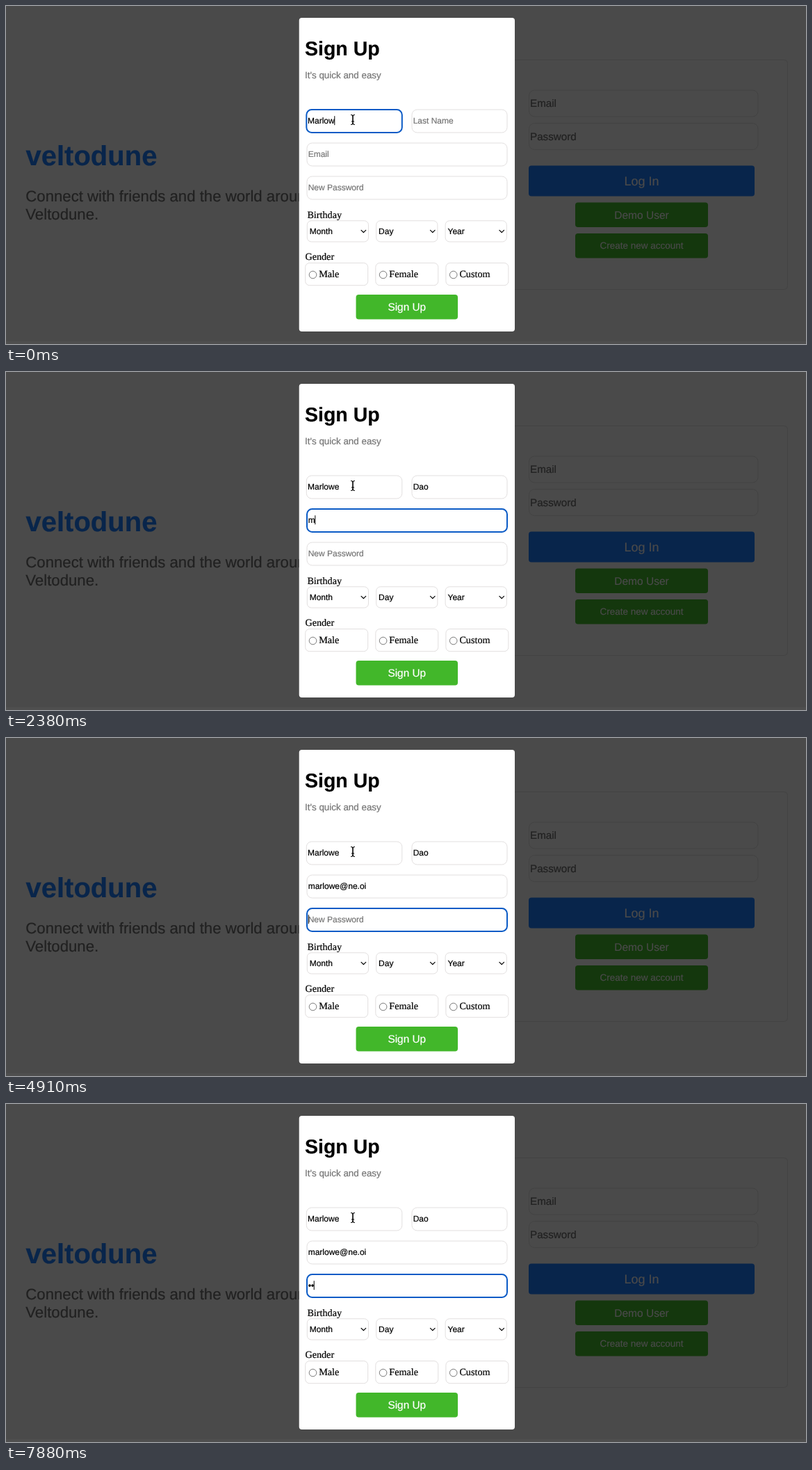
An HTML page for the animation above (8000 ms loop, 1151 by 486 pixels).

```html
<!DOCTYPE html>
<html lang="en">
<head>
<meta charset="utf-8">
<title>Sign up form</title>
<style>
  html, body { margin: 0; width: 100%; height: 100%; overflow: hidden; background: #4a4a4a; }
  svg { display: block; }
  text {
    font-family: "Liberation Sans", Arial, sans-serif;
    text-rendering: geometricPrecision;
    white-space: pre;
    stroke-width: 0.2;
  }
  .serif { font-family: "Liberation Serif", "Times New Roman", serif; }
  .bold { font-weight: bold; }
  .mid { text-anchor: middle; }
</style>
</head>
<body>
<svg id="stage" width="1151" height="486" viewBox="0 0 1151 486"></svg>
<script>
const LOOP = 8000, TICK = 148.5;
const DIM = "#4a4a4a", DIM_EDGE = "#434343", DIM_TEXT = "#212121";
const DIM_BLUE = "#08254b", DIM_GREEN = "#14370d";
const EDGE = "#e2dfdf", HINT = "#757575", FOCUS = "#0b5bc6", INK = "#000";
const stage = document.getElementById("stage");

function add(tag, attrs, content = "") {
  const el = document.createElementNS("http://www.w3.org/2000/svg", tag);
  for (const name in attrs) el.setAttribute(name, attrs[name]);
  el.textContent = content;
  return stage.appendChild(el);
}
const text = (x, y, size, fill, content, cls = "") =>
  add("text", { x, y, "font-size": size, fill, stroke: fill, class: cls }, content);
const box = (x, y, width, height, rx, fill, stroke = "none") =>
  add("rect", { x, y, width, height, rx, fill, stroke });
const line = (d, width) =>
  add("path", { d, stroke: INK, "stroke-width": width, fill: "none", "stroke-linecap": "round" });

function button(center, y, width, height, fill, ink, size, label) {
  box(center - width / 2, y, width, height, 4, fill);
  text(center, y + height / 2 + size * 0.35, size, ink, label, "mid");
}

// Dimmed page
box(0, 0, 1151, 486, 0, DIM);
box(0, 482, 1151, 4, 0, "#4f4f4f");
text(28.5, 229, 40, DIM_BLUE, "veltodune", "bold");
text(28.3, 280.5, 22.2, DIM_TEXT, "Connect with friends and the world around you on");
text(28.3, 306.5, 22.2, DIM_TEXT, "Veltodune.");
box(700, 77.5, 424.5, 330, 5, "none", DIM_EDGE);
["Email", "Password"].forEach((label, row) => {
  const y = 121 + row * 47.6;
  box(752.5, y, 329.5, 38, 8, "none", DIM_EDGE);
  text(754, y + 24.3, 15.2, DIM_TEXT, label);
});
button(914.5, 229.5, 325, 44, DIM_BLUE, DIM, 18, "Log In");
button(914.5, 282.5, 191, 35.5, DIM_GREEN, DIM, 15.5, "Demo User");
button(914.5, 327, 191, 35.5, DIM_GREEN, DIM, 13.5, "Create new account");

// Dialog
box(421.7, 17, 310.3, 451, 4, "#fff");
text(430, 70.6, 28.5, INK, "Sign Up", "bold");
text(430, 103.5, 13.4, HINT, "It's quick and easy");

function field(x, row, width, hint) {
  const y = 149 + row * 48, textX = x + 1.7;
  return {
    hint, textX, y, value: "",
    frame: box(x, y, width, 33, 7.5, "#fff", EDGE),
    label: text(textX, y + 20, 12, HINT, hint)
  };
}
const fields = [
  field(432.3, 0, 137.5, "First Name"),
  field(584, 0, 137, "Last Name"),
  field(433, 1, 288, "Email"),
  field(433, 2, 288, "New Password")
];

text(433.4, 304.5, 14.2, INK, "Birthday", "serif");
["Month", "Day", "Year"].forEach((label, i) => {
  const x = 433.3 + i * 99.4;
  box(x, 308.8, 88.2, 30.2, 6, "#fff", EDGE);
  text(x + 3.4, 327.7, 12, INK, label);
  line(`M${x + 77.8} 322.4l3.3 3.3l3.3 -3.3`, 1.2);
});

text(430.4, 365, 14.2, INK, "Gender", "serif");
["Male", "Female", "Custom"].forEach((label, i) => {
  const x = 430.7 + i * 101.1;
  box(x, 369.5, 90, 32.2, 6, "#fff", EDGE);
  add("circle", { cx: x + 10.8, cy: 386.5, r: 5.3, fill: "#fff", stroke: "#767676" });
  text(x + 19.5, 389.8, 14.2, INK, label, "serif");
});
button(576.8, 415, 146.5, 35.5, "#42b72a", "#fff", 15.4, "Sign Up");

const caret = add("rect", { width: 1, height: 13 });

// Text pointer: mirrored halves and a crossbar
for (const side of [-1, 1])
  line(`M${499 + side * 2.5} 156.5Q499 156.5 499 159V168Q499 170.5 ${499 + side * 2.5} 170.5`, 1.1);
line("M497.3 166H500.7", 1.1);

// Keys pressed in each tick: "-" is a pause, ">" is Tab, "<" is Backspace
const keys = ("Marlow e - - - - > - - D a o > - - - m a rl o w e - - @ - ne - . o i - - " +
  "> - • • •• - • • •• - < • - << < < << < < - ••").split(" ");

function typeUntil(tick) {
  let focus = 0, idle = 0;
  for (const f of fields) f.value = "";
  for (const pressed of keys.slice(0, tick + 1)) {
    idle = pressed === "-" ? idle + 1 : 0;
    for (const key of pressed) {
      if (key === ">") focus++;
      else if (key === "<") fields[focus].value = fields[focus].value.slice(0, -1);
      else if (key !== "-") fields[focus].value += key;
    }
  }
  return { active: fields[focus], caretOn: idle < 3 };
}

function render(time) {
  const { active, caretOn } = typeUntil(Math.floor((time + 5) / TICK));
  for (const f of fields) {
    const ink = f.value ? INK : HINT;
    f.label.textContent = f.value || f.hint;
    f.label.setAttribute("fill", ink);
    f.label.setAttribute("stroke", ink);
    f.frame.setAttribute("stroke", f === active ? FOCUS : EDGE);
    f.frame.setAttribute("stroke-width", f === active ? 2 : 1);
  }
  const width = active.value ? active.label.getComputedTextLength() : 0.5;
  caret.setAttribute("x", active.textX + width - 0.4);
  caret.setAttribute("y", active.y + 9.2);
  caret.setAttribute("visibility", caretOn ? "visible" : "hidden");
}

function loop() {
  render(performance.now() % LOOP);
  requestAnimationFrame(loop);
}
loop();
</script>
</body>
</html>
```
